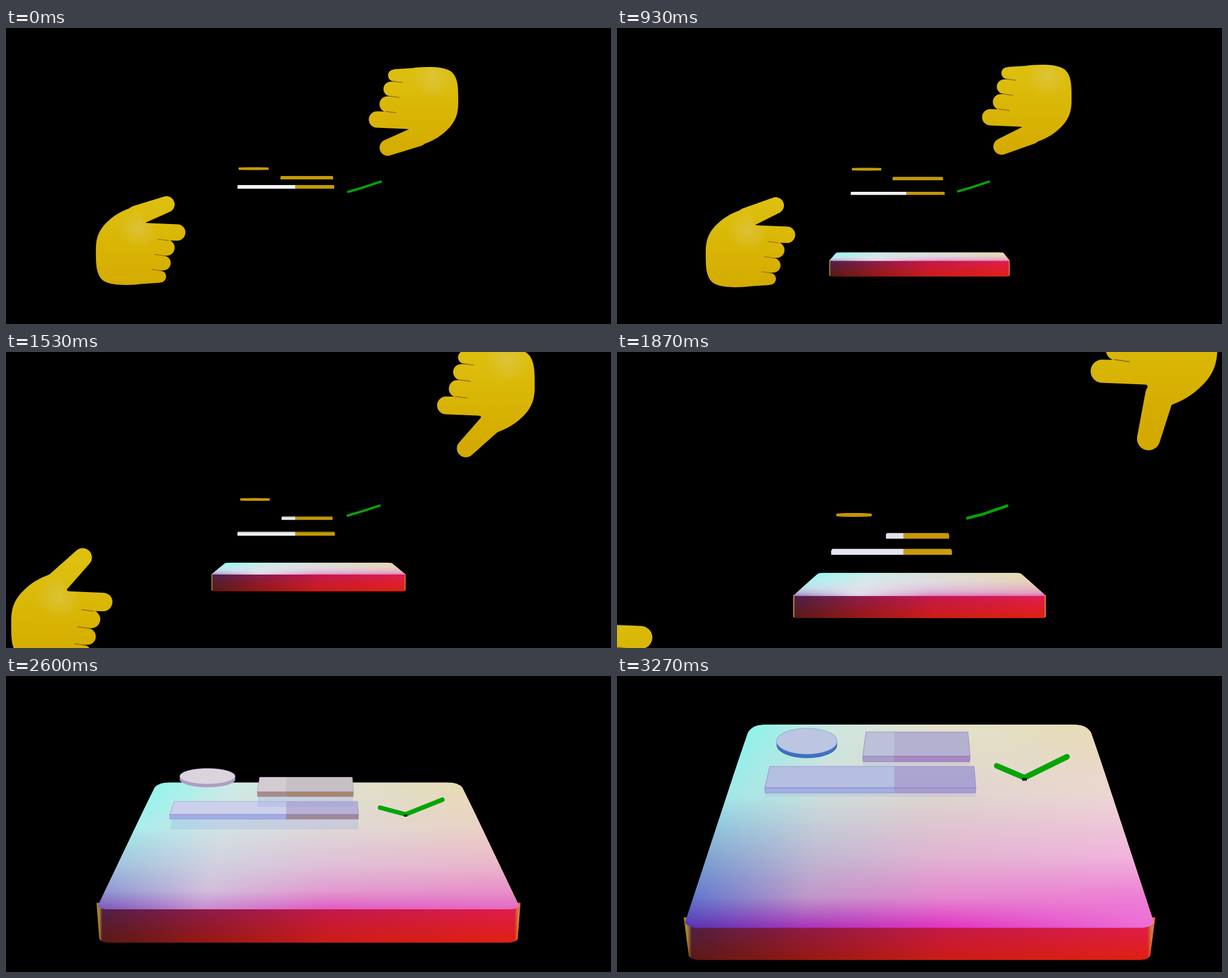
An HTML page with a canvas that plays this animation: 1069 px wide and 524 px high, repeating every 3390 ms.

```html
<!DOCTYPE html>
<html lang="en">
<head>
<meta charset="utf-8">
<title>Hands revealing a glass card</title>
<style>
html, body { margin: 0; width: 100%; height: 100%; overflow: hidden; background: #000; }
canvas { display: block; }
</style>
</head>
<body>
<canvas id="stage" width="1069" height="524"></canvas>
<script>
const ctx = document.getElementById('stage').getContext('2d');
const LOOP = 3390, FPS = 15, LAST_STEP = 49;

// ---------- keyframes ----------
const SCENE_TIMES = [0, 930, 1530, 1870, 2330, 2600, 3270];
const HAND_TIMES = [0, 600, 930, 1070, 1530, 1870, 2130, 2200];

const segment = (times, t) => {
  let i = 0;
  while (i < times.length - 2 && t >= times[i + 1]) i++;
  return i;
};

// Monotone cubic through the keys, coming to rest on the last one.
function curve(times, keys, t) {
  const last = times.length - 1;
  if (t >= times[last]) return keys[last];
  const slope = i => (keys[i + 1] - keys[i]) / (times[i + 1] - times[i]);
  const tangent = i => {
    if (i === 0) return slope(0);
    if (i === last) return 0;
    const a = slope(i - 1), b = slope(i);
    return a * b <= 0 ? 0 : 2 * a * b / (a + b);
  };
  const i = segment(times, t), span = times[i + 1] - times[i];
  const u = (t - times[i]) / span, w = 1 - u;
  return keys[i] * w * w * (1 + 2 * u) + keys[i + 1] * u * u * (3 - 2 * u)
    + span * u * w * (tangent(i) * w - tangent(i + 1) * u);
}

const at = (keys, t) => curve(SCENE_TIMES, keys, t);
const sample = (tracks, t) =>
  Object.fromEntries(Object.entries(tracks).map(([name, keys]) => [name, at(keys, t)]));

// ---------- colour ----------
const hex = s => s.match(/../g).map(h => parseInt(h, 16));
const colours = s => s.split(' ').map(hex);
const lerp = (a, b, k) => a + (b - a) * k;
const mix = (a, b, k) => a.map((v, i) => lerp(v, b[i], k));
const css = c => `rgb(${c.map(Math.round)})`;

function colourAt(keys, t) {
  const i = segment(SCENE_TIMES, t);
  const k = (t - SCENE_TIMES[i]) / (SCENE_TIMES[i + 1] - SCENE_TIMES[i]);
  return css(mix(keys[i], keys[i + 1], Math.min(1, k)));
}

// ---------- slab ----------
const slabTracks = {
  left: [380, 375, 363, 310.5, 210, 160, 118],
  right: [690, 694, 706, 758.5, 859, 909, 951],
  backLeft: [392, 388, 388, 356, 297, 267, 236],
  backRight: [678, 682, 681, 713, 773, 802, 833],
  back: [620, 397.5, 373, 391, 272, 188.5, 86],
  front: [640, 412.5, 394, 432, 405, 413, 445.5],
  bottom: [668, 440, 423.5, 471, 459, 472, 502.5],
  inset: [0, 0, 0, 0, 3, 5, 9],
  corner: [8, 8, 8, 10, 16, 22, 26],
  late: [0, 0, 0, 0, 0, 0.45, 1]
};
const STOPS = [0, 0.25, 0.55, 1];
const TOP_ROWS = [0, 0.35, 0.65, 0.85, 1];
const topEarly = [
  '96faf0 c8eeeb d7e1d7 e8dcb4', 'b0f0f0 d8e6ea dedce0 e8d0b8', 'bcdce8 dfe3ea dec8dc e6b8bc',
  'b4b4d8 e2deea deaad2 e2a0bc', '966ebe e1d2e6 e178c3 e164b4'
].map(colours);
const topLate = [
  '8cf4ea cfe6e0 e2e2cc e6dcb4', 'a2e8e8 cddedc ded4cd ecd6d4', '82a5d2 beb9d2 e1b4d2 f0b4dc',
  '6478cd be96c8 e487cd ee7dd4', '5532b4 a532b9 e132c3 eb6ed7'
].map(colours);
const frontFace = ['4a2458 8a1c5c c0185c e01c60', '581812 941810 cc1c14 e02010'].map(colours);

function shadeRows(y0, y1, edges, rows, palette) {
  for (let y = Math.floor(y0); y < y1; y++) {
    const v = Math.min(1, Math.max(0, (y - y0) / (y1 - y0)));
    const [x0, x1] = edges(v);
    const i = segment(rows, v), k = (v - rows[i]) / (rows[i + 1] - rows[i]);
    const g = ctx.createLinearGradient(x0, 0, x1, 0);
    STOPS.forEach((stop, n) => g.addColorStop(stop, css(mix(palette[i][n], palette[i + 1][n], k))));
    ctx.fillStyle = g;
    ctx.fillRect(x0 - 1, y, x1 - x0 + 2, 2);
  }
}

function topPath(s) {
  const depth = s.front - s.back, c = s.corner;
  const nearY = s.front - depth * 0.05, farY = s.back + depth * 0.04;
  const lean = (s.backLeft - s.left) * 0.04;
  const p = new Path2D();
  p.moveTo(s.left, nearY);
  p.lineTo(s.backLeft - lean, farY);
  p.quadraticCurveTo(s.backLeft + c * 0.15, s.back, s.backLeft + c, s.back);
  p.lineTo(s.backRight - c, s.back);
  p.quadraticCurveTo(s.backRight - c * 0.15, s.back, s.backRight + lean, farY);
  p.lineTo(s.right, nearY);
  p.quadraticCurveTo(s.right, s.front, s.right - c, s.front);
  p.lineTo(s.left + c, s.front);
  p.quadraticCurveTo(s.left, s.front, s.left, nearY);
  return p;
}

function sidePath(s) {
  const y = s.front - (s.front - s.back) * 0.05, c = s.corner * 0.8;
  const l = s.left + s.inset, r = s.right - s.inset, drop = c * 0.35;
  const p = new Path2D();
  p.moveTo(s.left, y);
  p.lineTo(l, s.bottom - drop);
  p.quadraticCurveTo(l + c * 0.2, s.bottom, l + c, s.bottom);
  p.lineTo(r - c, s.bottom);
  p.quadraticCurveTo(r - c * 0.2, s.bottom, r, s.bottom - drop);
  p.lineTo(s.right, y);
  p.closePath();
  return p;
}

function edgeGlow(x, width, colour, y, height) {
  const g = ctx.createLinearGradient(x, 0, x + width, 0);
  g.addColorStop(0, colour);
  g.addColorStop(0.5, colour);
  g.addColorStop(1, colour + '00');
  ctx.fillStyle = g;
  ctx.fillRect(Math.min(x, x + width), y, Math.abs(width), height);
}

function clipped(path, paint) {
  ctx.save();
  ctx.clip(path);
  paint();
  ctx.restore();
}

function drawSlab(s, top) {
  clipped(sidePath(s), () => {
    const y = s.front - s.corner;
    shadeRows(y, s.bottom, () => [s.left, s.right], [0, 1], frontFace);
    const w = s.corner * 0.32 + s.inset * 0.6;
    edgeGlow(s.left, w, '#a8842a', y, s.bottom - y);
    edgeGlow(s.right, -w, '#d07a30', y, s.bottom - y);
  });
  const palette = topEarly.map((row, i) => row.map((c, n) => mix(c, topLate[i][n], s.late)));
  clipped(top, () => shadeRows(s.back, s.front,
    v => [lerp(s.backLeft, s.left, v), lerp(s.backRight, s.right, v)], TOP_ROWS, palette));
}

// ---------- glass pieces ----------
const splitX = [511, 511.5, 511.5, 506, 455, 495, 490];
const rimAlpha = [0, 0, 0, 0, 0.2, 0.45, 0.6];
const shadowDrop = [0, 0, 0, 0, 36, 18, 7];
const shadowAlpha = [0, 0, 0, 0, 0.1, 0.25, 0.2];

const shortBar = {
  shape: {
    bl: [486, 488, 488, 477, 457, 448, 440], br: [577, 575, 576, 585, 603, 612, 620],
    fl: [485, 487, 487, 475, 454, 444, 434], fr: [578, 576, 577, 587, 605, 614, 624],
    back: [262, 263.5, 291, 320.5, 235, 179, 99], front: [263, 265, 292, 323, 248, 205, 142],
    bottom: [268, 269.5, 297, 330.5, 257.5, 213.5, 152]
  },
  top: ['c49a08 c49a08 e8e8e8 e4e2ea d2bc80 d2ccd0 bcc0d8', 'c49a08 c49a08 c49c0c c89c0c bc9a10 c6c0c4 b4b0d0'].map(colours),
  face: ['c49a08 c49a08 e8e8e8 e4e2ea c09a50 a88c84 a89cc8', 'c49a08 c49a08 c49c0c c8980c b98a20 a8866c a888c0'].map(colours)
};
const longBar = {
  shape: {
    bl: [410, 414, 410, 380, 325, 298, 270], br: [579, 578, 580, 590, 611, 621, 631],
    fl: [409, 413, 409, 378, 319, 289, 261], fr: [580, 579, 581, 592, 612, 623, 634],
    back: [278, 290, 318, 348.5, 270, 222, 160], front: [279, 291, 319.5, 352, 283, 245, 198],
    bottom: [284.5, 295.5, 325, 359, 291, 253.5, 207]
  },
  top: ['f2f2f4 f2f2f4 f2f2f4 e6e4ee e8deea ccd0ea b4bfe2', 'c49a08 c49a08 c49a08 c89c0c b09cc0 b8b0d4 aca4d0'].map(colours),
  face: ['f2f2f4 f2f2f4 f2f2f4 e6e4ee e0d0e4 a0aee6 a0b0e0', 'c49a08 c49a08 c49a08 c89c0c 905f40 a08894 a89cd0'].map(colours)
};
const disc = {
  shape: {
    x: [437.5, 441, 440, 418.5, 376.5, 356, 335.5], y: [247, 248, 259, 286.5, 215.5, 177.5, 115.5],
    rx: [26.5, 26, 26, 31.5, 43.5, 49, 53.5], ry: [0.5, 0.5, 0.5, 1.5, 8, 14, 23],
    thick: [4, 4, 4, 4, 5.5, 5.5, 7]
  },
  top: colours('c49a08 c49a08 c49a08 c89a08 ece8f0 dcd4dc bcc6e2'),
  side: colours('c49a08 c49a08 c49a08 c49208 d8d0dc b49cc0 3c70c0')
};

function quad(x0, x1, y0, x2, x3, y1) {
  const p = new Path2D();
  p.moveTo(x0, y0);
  p.lineTo(x1, y0);
  p.lineTo(x3, y1);
  p.lineTo(x2, y1);
  p.closePath();
  return p;
}

function fillSplit(path, x0, x1, split, pair, t) {
  const g = ctx.createLinearGradient(x0, 0, x1, 0);
  const k = Math.min(1, Math.max(0, (split - x0) / (x1 - x0)));
  const [a, b] = pair.map(keys => colourAt(keys, t));
  g.addColorStop(0, a);
  g.addColorStop(k, a);
  g.addColorStop(k, b);
  g.addColorStop(1, b);
  ctx.fillStyle = g;
  ctx.fill(path);
}

function drawBar(bar, t, slabTop) {
  const s = sample(bar.shape, t), split = at(splitX, t);
  const top = quad(s.bl, s.br, s.back, s.fl, s.fr, s.front);
  const inset = (s.front - s.back) * 0.02;
  const face = quad(s.fl, s.fr, s.front, s.fl + inset, s.fr - inset, s.bottom);
  clipped(slabTop, () => {
    ctx.translate(0, at(shadowDrop, t));
    ctx.fillStyle = `rgba(140,160,225,${at(shadowAlpha, t)})`;
    ctx.fill(quad(s.bl, s.br, s.back, s.fl, s.fr, s.bottom));
  });
  fillSplit(top, s.fl, s.fr, split, bar.top, t);
  fillSplit(face, s.fl, s.fr, split, bar.face, t);
  ctx.strokeStyle = `rgba(140,115,190,${at(rimAlpha, t)})`;
  ctx.lineWidth = 1.2;
  ctx.stroke(top);
  ctx.stroke(face);
}

function drawDisc(t) {
  const s = sample(disc.shape, t);
  const lower = new Path2D();
  lower.ellipse(s.x, s.y + s.thick, s.rx, s.ry, 0, 0, Math.PI);
  lower.lineTo(s.x - s.rx, s.y);
  lower.lineTo(s.x + s.rx, s.y);
  ctx.fillStyle = colourAt(disc.side, t);
  ctx.fill(lower);
  const top = new Path2D();
  top.ellipse(s.x, s.y, s.rx, s.ry, 0, 0, Math.PI * 2);
  ctx.fillStyle = colourAt(disc.top, t);
  ctx.fill(top);
  ctx.strokeStyle = `rgba(120,140,200,${at(rimAlpha, t)})`;
  ctx.lineWidth = 1.2;
  ctx.stroke(top);
}

// ---------- check mark ----------
const checkTracks = {
  x0: [605, 603, 604, 620, 652, 661, 671], y0: [290, 289, 289.5, 294, 263.5, 233, 159],
  x1: [627, 624, 626, 647, 690, 706, 720], y1: [283.5, 283, 283, 287, 259, 245, 180],
  x2: [662, 657, 660, 689, 745, 771, 795], y2: [272, 272, 272, 272.5, 230, 219, 143],
  width: [4, 4, 4, 5, 7, 8, 10], notch: [0, 0, 0, 1, 3, 6, 8]
};

function drawCheck(t, slabTop) {
  const c = sample(checkTracks, t);
  const p = new Path2D();
  p.moveTo(c.x0, c.y0);
  p.lineTo(c.x1, c.y1);
  p.lineTo(c.x2, c.y2);
  ctx.lineCap = c.width > 5 ? 'round' : 'square';
  ctx.lineJoin = 'round';
  clipped(slabTop, () => {
    ctx.translate(-9, at([40, 40, 40, 40, 41, 18, 5], t));
    ctx.strokeStyle = `rgba(215,185,80,${at([0, 0, 0, 0, 0.45, 0.06, 0], t)})`;
    ctx.lineWidth = 3;
    ctx.stroke(p);
  });
  ctx.strokeStyle = '#06a406';
  ctx.lineWidth = c.width;
  ctx.stroke(p);
  ctx.fillStyle = '#031803';
  ctx.fillRect(c.x1 - c.notch / 2, c.y1 + c.width * 0.05, c.notch, c.notch * 0.6);
}

// ---------- hands (origin at the index fingertip) ----------
const leftHand = {
  x: [317, 317, 315, 295, 189, 61, -80, -120], y: [362, 362, 366, 374, 442, 506, 560, 575],
  scale: [1, 1, 1, 1.01, 1.13, 1.4, 1.7, 1.75]
};
const rightHand = {
  x: [641, 641, 645, 666, 761, 838, 1030, 1090], y: [162, 162, 158, 148, 95, 34, 56, 60],
  scale: [1, 1, 1, 1.01, 1.09, 1.42, 1.7, 1.75]
};
const thumbAngle = [20.6, 20.6, 23, 26, 45, 76, 85, 85];
const palm = new Path2D('M-70-17L-86-47C-115-39-132-27-146-10C-160 8-158 25-158 45' +
  'C-158 70-152 82-142 87C-128 94-100 94-77 91L-45 89L-52-13Z');

function limb(x0, y0, r0, x1, y1, r1) {
  const a = Math.atan2(y1 - y0, x1 - x0), q = Math.PI / 2;
  ctx.beginPath();
  ctx.arc(x1, y1, r1, a - q, a + q);
  ctx.arc(x0, y0, r0, a + q, a + 3 * q);
  ctx.fill();
}

function drawHand(hand, t, turned) {
  const key = keys => curve(HAND_TIMES, keys, t);
  const size = key(hand.scale) * (turned ? -1 : 1);
  const angle = key(thumbAngle) * Math.PI / 180;
  ctx.save();
  ctx.translate(key(hand.x), key(hand.y));
  ctx.scale(size, size);

  const skin = turned ? ctx.createLinearGradient(0, 95, 0, -65) : ctx.createLinearGradient(0, -65, 0, 95);
  skin.addColorStop(0, '#dec010');
  skin.addColorStop(0.5, '#d9b606');
  skin.addColorStop(1, '#d4aa00');
  ctx.fillStyle = skin;
  ctx.fill(palm);
  limb(-86, -30, 18, -86 + 56 * Math.cos(angle), -30 - 56 * Math.sin(angle), 14.5);
  limb(-60, 78, 11, -44.5, 78, 10.5);
  limb(-62, 54, 13.5, -39, 54, 13);
  limb(-64, 27, 14, -33, 27, 14);
  limb(-75, -2, 15, -14.5, 0, 14.5);

  ctx.strokeStyle = 'rgba(120,70,10,.6)';
  ctx.lineWidth = 1.6;
  ctx.lineCap = 'round';
  ctx.beginPath();
  for (const [x, y] of [[-34, 14], [-40, 41], [-45, 67.5]]) {
    ctx.moveTo(x - 14, y - 2);
    ctx.quadraticCurveTo(x - 5, y - 1, x + 4, y + 0.5);
  }
  ctx.stroke();

  const [hx, hy] = turned ? [-114, 72] : [-84, -8];
  const shine = ctx.createRadialGradient(hx, hy, 0, hx, hy, 36);
  shine.addColorStop(0, 'rgba(222,202,90,.55)');
  shine.addColorStop(1, 'rgba(222,202,90,0)');
  ctx.fillStyle = shine;
  ctx.fill(palm);
  ctx.restore();
}

// ---------- loop ----------
function draw(t) {
  ctx.fillStyle = '#000';
  ctx.fillRect(0, 0, 1069, 524);
  const slab = sample(slabTracks, t), top = topPath(slab);
  if (slab.back < 524) drawSlab(slab, top);
  drawBar(longBar, t, top);
  drawBar(shortBar, t, top);
  drawDisc(t);
  drawCheck(t, top);
  if (t < 2200) {
    drawHand(leftHand, t, false);
    drawHand(rightHand, t, true);
  }
}

let shown = -1, start;
function tick(now) {
  start ??= now;
  const step = Math.min(LAST_STEP, Math.floor(((now - start) % LOOP + 5) * FPS / 1000));
  if (step !== shown) {
    shown = step;
    draw(step * 1000 / FPS);
  }
  requestAnimationFrame(tick);
}
requestAnimationFrame(tick);
</script>
</body>
</html>
```
